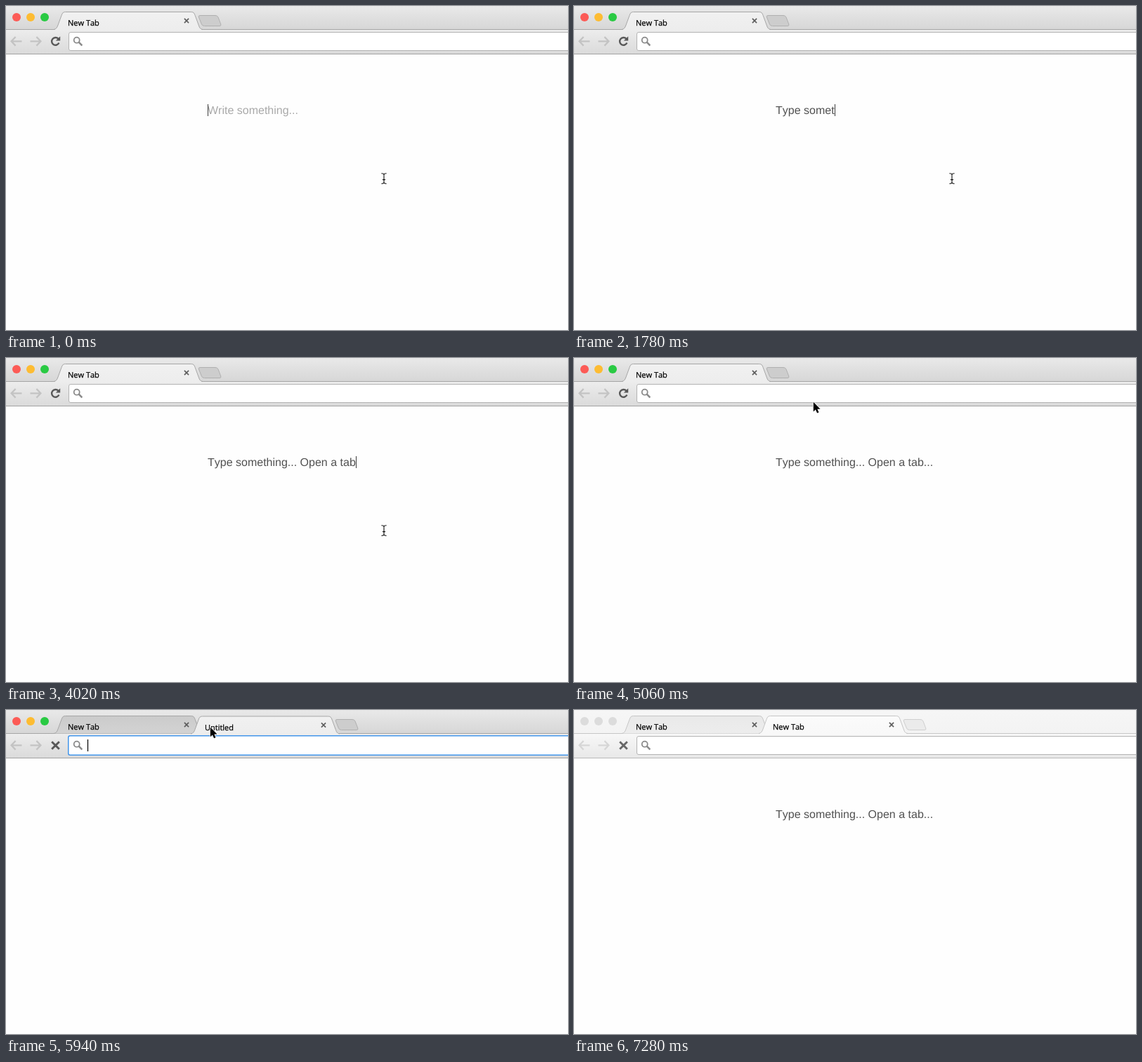
Write an HTML page that moves like this. It is 800 px wide and 462 px high and loops after 7.32 s.

```html
<!DOCTYPE html>
<html lang="en">
<head>
<meta charset="utf-8">
<title>New Tab</title>
<style>
  html, body { margin: 0; width: 100%; height: 100%; overflow: hidden; background: #fefefe; }
  svg {
    display: block; width: 100vw; height: 100vh;
    --title-a: #e9e9e9; --title-b: #d6d6d6;
    --tab-a: #f1f1f1; --tab-b: #ededed;
    --back-a: #cbcbcb; --back-b: #d3d3d3;
    --bar-a: #ededed; --bar-b: #dadada;
    --edge: #a6a6a6; --base: #a2a2a2; --plus: #cdcdcd; --plus-edge: #b0b0b0;
    --arrow: #c3c3c3; --icon: #585858;
  }
  svg.idle {
    --title-a: #f6f6f6; --title-b: #f3f3f3;
    --tab-a: #fbfbfb; --tab-b: #f8f8f8;
    --back-a: #e9e9e9; --back-b: #ededed;
    --bar-a: #f8f8f8; --bar-b: #e8e8e8;
    --edge: #c6c6c6; --base: #b9b9b9; --plus: #ebebeb; --plus-edge: #cfcfcf;
    --arrow: #d6d6d6; --icon: #686868;
  }
  .a-title { stop-color: var(--title-a); } .b-title { stop-color: var(--title-b); }
  .a-tab { stop-color: var(--tab-a); } .b-tab { stop-color: var(--tab-b); }
  .a-back { stop-color: var(--back-a); } .b-back { stop-color: var(--back-b); }
  .a-bar { stop-color: var(--bar-a); } .b-bar { stop-color: var(--bar-b); }
  .idle #lights circle { fill: #dcdcdc; }
  .shape { fill: url(#tabFill); stroke: var(--edge); }
  .behind .shape { fill: url(#backFill); }
  .edge { stroke: var(--edge); }
  #plus path { fill: var(--plus); stroke: var(--plus-edge); }
  #plus.hover path { fill: #e4e4e4; }
  .line { fill: none; }
  .title {
    font: 11px "Open Sans", "Noto Sans", sans-serif; font-kerning: none;
    fill: #000; stroke: #000; stroke-width: .25; text-rendering: geometricPrecision;
  }
  .close { stroke: #5c5c5c; stroke-width: 1.6; }
  .arrow { stroke: var(--arrow); stroke-width: 2.3; }
  .icon { stroke: var(--icon); }
  #box { fill: #fff; stroke: #b3b3b3; }
  #box.focus { x: 88.75px; y: 36.75px; height: 27.5px; stroke: #4295ea; stroke-width: 1.5; }
  .page { font: 16px "Liberation Sans", Arial, sans-serif; font-kerning: none; white-space: pre; text-rendering: geometricPrecision; }
  #hint { fill: #a9a9a9; }
  #typed { fill: #515151; }
</style>
</head>
<body>
<svg id="stage" viewBox="0 0 800 462">
  <defs>
    <linearGradient id="titleFill" x2="0" y2="1"><stop class="a-title"/><stop class="b-title" offset="1"/></linearGradient>
    <linearGradient id="tabFill" x2="0" y2="1"><stop class="a-tab"/><stop class="b-tab" offset="1"/></linearGradient>
    <linearGradient id="backFill" x2="0" y2="1"><stop class="a-back"/><stop class="b-back" offset="1"/></linearGradient>
    <linearGradient id="barFill" x2="0" y2="1"><stop class="a-bar"/><stop class="b-bar" offset="1"/></linearGradient>
    <path id="tabShape" d="M68 33.5C71.5 33 72.7 30.5 73.7 28L79 13.5C80.2 10 81.2 8.5 84.5 8.5H263.5C267 8.5 268 10 269.2 13.5L274.5 28C275.5 31 276.5 33 280 33.5"/>
    <path id="cross" class="close" d="M253.9 17.9l6.2 6.2m0-6.2l-6.2 6.2"/>
    <path id="beamShape" d="M-3.2-7.3Q-.4-7.3 0-5.6Q.4-7.3 3.2-7.3M0-5.6V5.6M-3.2 7.3Q-.4 7.3 0 5.6Q.4 7.3 3.2 7.3M-1.6 1.6H1.6"/>
  </defs>

  <rect width="800" height="462" fill="#fefefe"/>
  <rect width="800" height="34" fill="url(#titleFill)"/>
  <rect y="33" width="800" height="36" fill="url(#barFill)"/>
  <path class="edge" d="M0 33.5H800"/>
  <path d="M0 68.5H800" stroke="var(--base)"/>

  <g id="lights">
    <circle cx="15" cy="16" r="6" fill="#fc5b56"/>
    <circle cx="35" cy="16" r="6" fill="#fdbc32"/>
    <circle cx="55" cy="16" r="6" fill="#29ca43"/>
  </g>

  <g id="first">
    <use href="#tabShape" class="shape"/>
    <path id="join" d="M70 33.5H278" stroke="var(--tab-b)"/>
    <text class="title" x="88" y="28">New Tab</text>
    <use href="#cross"/>
  </g>
  <g id="second">
    <use href="#tabShape" class="shape"/>
    <path d="M70 33.5H278" stroke="var(--tab-b)"/>
    <text class="title" id="name" x="88" y="28"></text>
    <use href="#cross"/>
  </g>
  <g id="plus">
    <path d="M276 13.5H298Q301 13.5 302 16L305.8 26Q306.6 28.5 304 28.5H282.5Q279.5 28.5 278.5 26L274.4 16Q273.6 13.5 276 13.5Z"/>
  </g>

  <path class="line arrow" d="M13.6 44L7.6 50.3L13.6 56.6M8 50.3H22.5"/>
  <path class="line arrow" d="M43.4 44L49.4 50.3L43.4 56.6M49 50.3H34.5"/>
  <g id="reload">
    <path class="line icon" stroke-width="2.4" d="M74.4 46.6A5.4 5.4 0 1 0 75.4 52.6"/>
    <path fill="var(--icon)" d="M77.2 43.2V49.6H70.8Z"/>
  </g>
  <path id="stop" class="line icon" stroke-width="2.9" d="M65.2 45.2l10.6 10.6m0-10.6l-10.6 10.6"/>

  <rect id="box" x="89.5" y="37.5" width="730" height="26" rx="2.5"/>
  <circle cx="100.7" cy="48.7" r="4" class="line" stroke="#8a8a8a" stroke-width="1.8"/>
  <path d="M103.7 51.7L108.3 56.3" stroke="#8a8a8a" stroke-width="2.5"/>
  <path id="boxCaret" d="M116.5 42V59" stroke="#000" stroke-width="1.2"/>

  <text id="hint" class="page" x="287" y="154">Write something...</text>
  <text id="typed" class="page" x="287" y="154"></text>
  <path id="caret" d="M.5 140V157" stroke="#3c3c3c"/>

  <g id="beam" class="line" stroke-linecap="round">
    <use href="#beamShape" stroke="#fff" stroke-width="2.6"/>
    <use href="#beamShape" stroke="#111" stroke-width="1.1"/>
  </g>
  <path id="pointer" d="M0 0V13.6L3.1 10.8L5.3 15.6L7.7 14.6L5.6 9.9H9.8Z" fill="#000" stroke="#fff" stroke-width="1.6" paint-order="stroke"/>
</svg>
<script>
const LOOP = 7320, LEFT = 287, SHIFT = 195;
const $ = id => document.getElementById(id);

// Each entry changes part of the state from its time (ms) onward.
const steps = [
  [0, { text: "", hint: 1, caret: 1, beam: [538, 246] }],
  [450, { caret: 0 }],
  [600, { text: "T", hint: 0, caret: 1 }],
  [740, { text: "Ty" }],
  [1040, { text: "Type" }],
  [1190, { text: "Type " }],
  [1480, { text: "Type s" }],
  [1630, { text: "Type som" }],
  [1780, { text: "Type somet" }],
  [2380, { text: "Type someth" }],
  [2530, { text: "Type somethi" }],
  [2680, { text: "Type somethin" }],
  [2830, { text: "Type something" }],
  [3280, { caret: 0 }],
  [3420, { text: "Type something.", caret: 1 }],
  [3720, { text: "Type something..." }],
  [3870, { text: "Type something... Open" }],
  [4020, { text: "Type something... Open a tab" }],
  [4160, { text: "Type something... Open a tab..." }],
  [4760, { caret: 0 }],
  [4910, { beam: [450, 160] }],
  [5060, { beam: 0, pointer: [340.8, 62.8] }],
  [5210, { pointer: [306, 36] }],
  [5350, { pointer: [295, 27], hover: 1, caret: 1 }],
  [5500, { pointer: [291.5, 25] }],
  [5640, { pointer: [290.8, 24.6] }],
  [5940, { tab: "Untitled", drop: .5, hover: 0, caret: 0, blank: 1, focus: 1, boxCaret: 1 }],
  [6090, { drop: 0 }],
  [6240, { tab: "New Tab" }],
  [6390, { blank: 0, pointer: 0 }],
  [6540, { boxCaret: 0 }],
  [7140, { boxCaret: 1 }],
  [7280, { idle: 1, focus: 0, boxCaret: 0 }]
];

const stateAt = t => Object.assign({}, ...steps.filter(s => s[0] <= t).map(s => s[1]));
const show = (id, on) => { $(id).style.display = on ? "" : "none"; };
const move = (id, x, y) => $(id).setAttribute("transform", `translate(${x} ${y})`);

function place(id, pos) {
  show(id, pos);
  if (pos) move(id, ...pos);
}

function draw(s) {
  const two = !!s.tab;
  $("stage").classList.toggle("idle", !!s.idle);
  $("first").classList.toggle("behind", two);
  $("plus").classList.toggle("hover", !!s.hover);
  $("box").classList.toggle("focus", !!s.focus);
  show("join", !two);
  show("reload", !two);
  show("stop", two);
  place("second", two && [SHIFT, s.drop]);
  $("name").textContent = s.tab || "";
  move("plus", two ? SHIFT : 0, 0);
  show("boxCaret", s.boxCaret);
  show("hint", s.hint);
  show("typed", !s.blank);
  $("typed").textContent = s.text;
  show("caret", s.caret);
  if (s.caret) {
    const width = s.text ? $("typed").getComputedTextLength() : 0;
    move("caret", Math.round(LEFT + width), 0);
  }
  place("beam", s.beam);
  place("pointer", s.pointer);
}

const start = performance.now();
function tick() {
  draw(stateAt((performance.now() - start) % LOOP));
  requestAnimationFrame(tick);
}
tick();
</script>
</body>
</html>
```
